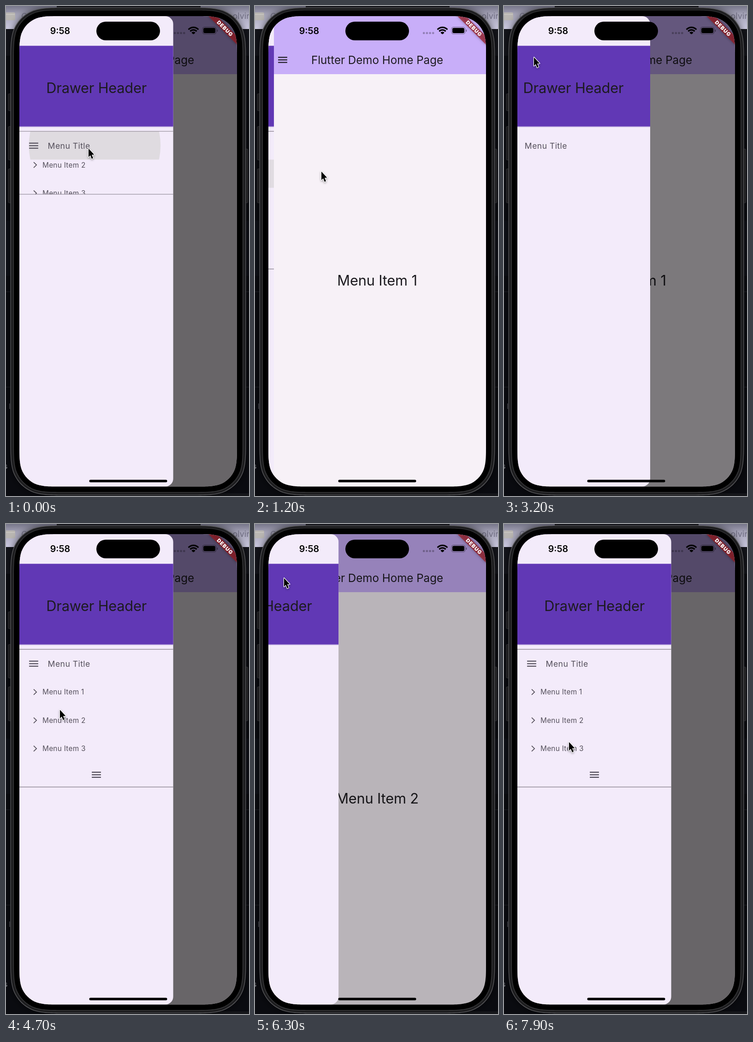
An HTML page with a canvas that plays this animation: 527 px wide and 1064 px high, repeating every 8000 ms.

```html
<!DOCTYPE html>
<html>
<head>
<meta charset="utf-8">
<style>
html, body { margin: 0; width: 100%; height: 100%; overflow: hidden; background: #0a0b10; }
canvas { display: block; width: 527px; height: 1064px; }
</style>
</head>
<body>
<canvas id="stage" width="527" height="1064"></canvas>
<script>
const ctx = document.getElementById('stage').getContext('2d');
const LOOP = 8000, STEP = 100;
const DRAWER_W = 333.8, UNIT = 1.098;
const TILE_TOP = 272, ROW = 61.4, CHILDREN_H = 237;
const INK = '#1d1b20', MUTED = '#55505c';

// Drawer flings: [time, target]; tile taps: [time]; ripples: [start, tap x, row]
const FLINGS = [[-3000, 1], [971, 0], [3044, 1], [5062, 0], [6231, 1]];
const EXPANSIONS = [-100, 3950, 7400];
const RIPPLES = [[-110, 180, 0], [960, 143, 1], [3940, 118, 0], [5050, 117, 2], [7390, 150, 0]];
// Pointer moves: [start, end, x, y]
const MOVES = [
  [-200, 0, 178, 308], [150, 850, 143, 358], [1420, 2650, 64, 110],
  [3200, 3850, 118, 298], [4150, 4650, 116, 402], [4720, 5000, 117, 428],
  [5450, 6150, 62, 116], [6400, 7250, 150, 300], [7500, 7880, 140, 472]
];

const clamp = v => Math.max(0, Math.min(1, v));
const mix = (a, b, k) => a + (b - a) * k;
const smooth = k => k * k * (3 - 2 * k);
const easeIn = k => Math.pow(k, 1.667);
const easeOut = k => 1 - Math.pow(1 - k, 2.2);

function rect(x, y, w, h, color) {
  ctx.fillStyle = color;
  ctx.fillRect(x, y, w, h);
}

function roundPath(x, y, w, h, r) {
  ctx.beginPath();
  ctx.roundRect(x, y, w, h, r);
}

function round(x, y, w, h, r, color) {
  roundPath(x, y, w, h, r);
  ctx.fillStyle = color;
  ctx.fill();
}

// Rounded box with continuous-curvature corners, as on the device
function smoothPath(x, y, w, h, r) {
  const corners = [[x, y, 1, 0], [x + w, y, 0, 1], [x + w, y + h, -1, 0], [x, y + h, 0, -1]];
  ctx.beginPath();
  for (const [cx, cy, ux, uy] of corners) {
    // a runs along the outgoing edge, b along the incoming one
    const at = (a, b) => [cx + (a * ux - b * uy) * r, cy + (a * uy + b * ux) * r];
    ctx.lineTo(...at(0, 1.529));
    ctx.bezierCurveTo(...at(0, 1.088), ...at(0, 0.868), ...at(0.075, 0.631));
    ctx.bezierCurveTo(...at(0.169, 0.373), ...at(0.373, 0.169), ...at(0.631, 0.075));
    ctx.bezierCurveTo(...at(0.868, 0), ...at(1.088, 0), ...at(1.529, 0));
  }
  ctx.closePath();
}

function smoothBox(x, y, w, h, r, color) {
  smoothPath(x, y, w, h, r);
  ctx.fillStyle = color;
  ctx.fill();
}

function polyline(points) {
  ctx.beginPath();
  points.forEach(([x, y]) => ctx.lineTo(x, y));
}

function text(str, x, y, size, color, { weight = 400, spacing = 0, align = 'left' } = {}) {
  ctx.font = `${weight} ${size}px Inter, sans-serif`;
  ctx.letterSpacing = spacing + 'px';
  ctx.textAlign = align;
  ctx.textBaseline = 'alphabetic';
  ctx.fillStyle = color;
  ctx.fillText(str, x, y);
}

function menuIcon(x, y, color) {
  for (const dy of [-5.5, 0, 5.5]) rect(x - 9.9, y + dy - 1.1, 19.8, 2.2, color);
}

function drawerOpen(t) {
  const [start, target] = FLINGS.filter(f => f[0] <= t).pop();
  const u = 22.36 * (t - start) / 1000;
  let rest = (1 + u) * Math.exp(-u);
  if (rest < 0.01) rest = 0;
  return target ? 1 - rest : rest;
}

function expansion(t) {
  const opened = FLINGS.filter(f => f[0] <= t && f[1]).pop()[0];
  const tap = EXPANSIONS.filter(e => e <= t).pop();
  return tap > opened ? clamp((t - tap) / 200) : 0;
}

function pointer(t) {
  let [, , x, y] = MOVES[0];
  for (const [start, end, tx, ty] of MOVES) {
    const k = smooth(clamp((t - start) / (end - start)));
    x = mix(x, tx, k);
    y = mix(y, ty, k);
  }
  return [x, y];
}

function drawDesktop() {
  rect(0, 0, 527, 1064, '#0a0b10');
  const bar = ctx.createLinearGradient(0, 0, 0, 50);
  bar.addColorStop(0, '#77768a');
  bar.addColorStop(0.35, '#a5a3b7');
  bar.addColorStop(1, '#cdcbe2');
  rect(0, 0, 527, 50, bar);
  rect(0, 50, 527, 58, '#13141a');
  round(-8, 14, 28, 17, 3, '#b9b6b2');
  rect(-8, 18, 27, 1, '#d2d0cb');
  text('C', 33, 29, 18, '#77758a');
  text('olvir', 528, 28, 18, '#6f6d82', { align: 'right' });
  rect(0, 466, 527, 120, '#0e1017');
  for (const y of [620, 827]) rect(0, y, 527, 1, '#23242b');
  for (const [y, h] of [[190, 38], [261, 74], [353, 75]]) {
    round(4.5, y, 20, h, 3, '#3c3c40');
    round(5.5, y + 1, 20, h - 2, 2, '#242427');
  }
  round(500, 310, 25, 118, 3, '#3c3c40');
  round(500, 311, 24, 116, 2, '#242427');
  rect(7, 863, 1.5, 12, '#55565c');
  text('s', -5, 1005, 16, '#85868c');
  rect(108, 1058, 419, 6, '#15161a');
}

function drawPhone() {
  rect(110, 0, 312, 4, '#1d1d23');
  ctx.save();
  ctx.shadowColor = 'rgba(0,0,0,0.55)';
  ctx.shadowBlur = 16;
  smoothBox(9.5, 3, 511, 1059.5, 80, '#5b5b5e');
  ctx.restore();
  smoothBox(10.8, 4.2, 508.4, 1057, 79, '#1d1d1f');
  smoothBox(15.5, 8.5, 499, 1048.5, 74, '#3a3a3c');
  smoothBox(17, 9.5, 496, 1046, 72.5, '#000');
}

function drawPage(t, open) {
  rect(29, 22, 472, 1022, '#fdf7fd');
  rect(29, 22, 472, 126, '#cdb2ff');
  menuIcon(60, 117, INK);
  text('Flutter Demo Home Page', 265, 126, 24.15, INK, { align: 'center' });
  const item = t >= FLINGS[3][0] ? 2 : 1;
  text('Menu Item ' + item, 265, 606.5, 30.74, INK, { spacing: -0.15, align: 'center' });
  if (open > 0) rect(29, 22, 472, 1022, `rgba(0,0,0,${0.59 * open})`);
}

function drawRipple(t) {
  for (const [start, tapX, row] of RIPPLES) {
    const age = t - start;
    if (age < 0 || age > 375) continue;
    const k = easeOut(clamp(age / 225));
    const alpha = clamp(age / 75) * clamp((375 - age) / 150);
    ctx.save();
    ctx.beginPath();
    ctx.rect(29, TILE_TOP + row * ROW, DRAWER_W, ROW);
    ctx.clip();
    ctx.beginPath();
    ctx.arc(mix(tapX, 196, k), TILE_TOP + (row + 0.5) * ROW, 170 * mix(0.3, 1, k), 0, 7);
    ctx.fillStyle = `rgba(223,219,224,${alpha})`;
    ctx.fill();
    ctx.restore();
  }
}

function drawChildren(height) {
  ctx.save();
  ctx.beginPath();
  ctx.rect(29, TILE_TOP + 62, DRAWER_W, height);
  ctx.clip();
  ctx.translate(0, (height - CHILDREN_H) / 2);
  for (let i = 1; i <= 3; i++) {
    const y = 303.5 + i * ROW;
    polyline([[60, y - 6], [66.2, y], [60, y + 6]]);
    ctx.strokeStyle = MUTED;
    ctx.lineWidth = 1.7;
    ctx.stroke();
    text('Menu Item ' + i, 79, y + 5.5, 15.37, MUTED, { spacing: 0.27 });
  }
  menuIcon(196, 544.5, '#4b4652');
  ctx.restore();
}

function drawDrawer(t, open) {
  if (open <= 0) return;
  ctx.save();
  ctx.translate((open - 1) * DRAWER_W, 0);
  roundPath(29, 22, DRAWER_W, 1021.5, [0, 17.5, 17.5, 0]);
  ctx.clip();
  rect(29, 22, DRAWER_W, 1022, '#f3ebfa');
  rect(29, 86.4, DRAWER_W, 175.2, '#6138b5');
  rect(29, 261.6, DRAWER_W, 1.1, '#a58fd2');
  text('Drawer Header', 196.2, 189, 30.74, INK, { spacing: -0.2, align: 'center' });

  const grow = expansion(t);
  const height = CHILDREN_H * easeIn(grow);
  drawRipple(t);
  menuIcon(60, 303.3, MUTED);
  text('Menu Title', 90.6, 309.8, 17.57, MUTED, { spacing: 0.45 });
  if (grow > 0) {
    drawChildren(height);
    const line = `rgba(124,118,128,${easeOut(grow)})`;
    rect(29, TILE_TOP - 0.5, DRAWER_W, 1.2, line);
    rect(29, TILE_TOP + 62 + height - 0.5, DRAWER_W, 1.2, line);
  }
  ctx.restore();
}

function drawBanner() {
  ctx.save();
  ctx.translate(501, 22);
  ctx.rotate(Math.PI / 4);
  ctx.scale(UNIT, UNIT);
  ctx.save();
  ctx.shadowColor = 'rgba(0,0,0,0.5)';
  ctx.shadowBlur = 6;
  rect(-40, 28, 80, 12, 'rgba(160,24,28,0.66)');
  ctx.restore();
  text('DEBUG', 0.5, 37.7, 10.2, '#fff', { weight: 900, spacing: 0.9, align: 'center' });
  ctx.restore();
}

function drawStatus() {
  text('9:58', 117.5, 61, 19.6, '#000', { weight: 600, align: 'center' });
  round(196, 34, 138, 40.5, 20.2, '#000');
  for (let i = 0; i < 4; i++) round(364 + i * 6.7, 56.5, 4.4, 4.4, 1.6, 'rgba(0,0,0,0.27)');

  // Wi-Fi fan
  ctx.save();
  ctx.beginPath();
  ctx.moveTo(406.5, 62);
  ctx.arc(406.5, 62, 18, -Math.PI * 0.75, -Math.PI * 0.25);
  ctx.clip();
  ctx.strokeStyle = '#000';
  ctx.lineWidth = 3.2;
  for (const r of [9.2, 14.6]) {
    ctx.beginPath();
    ctx.arc(406.5, 61, r, Math.PI, 0);
    ctx.stroke();
  }
  ctx.beginPath();
  ctx.arc(406.5, 61, 5.2, Math.PI, 0);
  ctx.fillStyle = '#000';
  ctx.fill();
  ctx.restore();

  roundPath(426, 45.5, 30, 15.5, 5);
  ctx.strokeStyle = 'rgba(0,0,0,0.4)';
  ctx.lineWidth = 1.1;
  ctx.stroke();
  round(428, 47.5, 26, 11.5, 3.3, '#000');
  round(457.5, 51, 1.8, 5, 1, 'rgba(0,0,0,0.42)');
  round(180.5, 1028.7, 169, 5.5, 2.7, '#000');
}

function drawPointer(t) {
  const [x, y] = pointer(t);
  ctx.save();
  ctx.translate(x + 1, y + 1.5);
  ctx.scale(0.84, 0.9);
  polyline([[0, 0], [0, 20.5], [4.6, 16.3], [8.2, 24.6], [11.8, 23], [8.3, 15], [14.6, 14.6]]);
  ctx.closePath();
  ctx.lineJoin = 'round';
  ctx.shadowColor = 'rgba(0,0,0,0.35)';
  ctx.shadowBlur = 4;
  ctx.shadowOffsetY = 2;
  ctx.strokeStyle = '#fff';
  ctx.lineWidth = 2.8;
  ctx.stroke();
  ctx.shadowColor = 'transparent';
  ctx.fillStyle = '#000';
  ctx.fill();
  ctx.restore();
}

function draw(now) {
  const t = Math.floor((now % LOOP) / STEP) * STEP;
  const open = drawerOpen(t);
  drawDesktop();
  drawPhone();
  ctx.save();
  smoothPath(29, 22, 472, 1021.5, 60.4);
  ctx.clip();
  drawPage(t, open);
  drawDrawer(t, open);
  drawBanner();
  drawStatus();
  ctx.restore();
  drawPointer(t);
}

let origin;
function tick(now) {
  origin ??= now;
  draw(Math.max(0, now - origin));
  requestAnimationFrame(tick);
}
draw(0);
requestAnimationFrame(tick);
</script>
</body>
</html>
```
